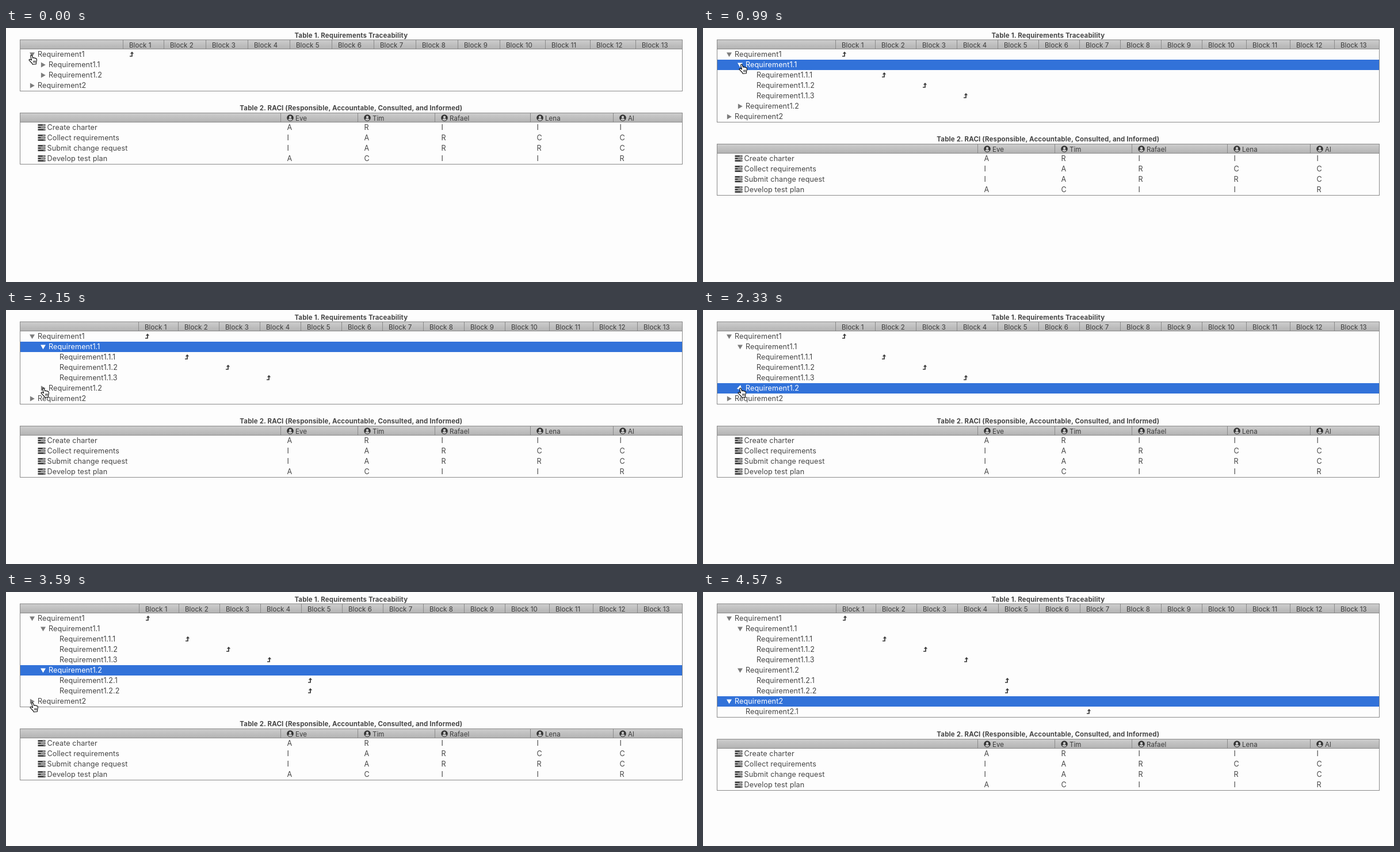
These frames come from a looping animation (1201x441 px, 8.17 s). An HTML page:

```html
<!DOCTYPE html>
<html lang="en">
<head>
<meta charset="utf-8">
<title>Requirements tables</title>
<style>
  html, body { margin: 0; width: 100%; height: 100%; overflow: hidden; background: #fdfdfd; }
  svg { display: block; width: 1201px; height: 441px; }
  text { font-family: Inter, "Open Sans", sans-serif; fill: #464646; white-space: pre; }
  .title { font-size: 11.5px; font-weight: 700; letter-spacing: .14px; text-anchor: middle; }
  .head { font-size: 11.5px; letter-spacing: .08px; fill: #3c3c3c; }
  .cell { font-size: 12.6px; letter-spacing: .1px; }
  .sel { fill: #fff; }
  .line { fill: none; stroke: #8a8a8a; shape-rendering: crispEdges; }
</style>
</head>
<body>
<svg viewBox="0 0 1201 441">
  <defs>
    <linearGradient id="bar" x1="0" y1="0" x2="0" y2="1">
      <stop offset="0" stop-color="#cecece"/>
      <stop offset="1" stop-color="#b2b2b2"/>
    </linearGradient>
    <g id="link">
      <path d="M-3.5 3.5H.5V-2" fill="none" stroke="#383838" stroke-width="1.7"/>
      <path d="M-2.7-1 .5-4.6 3.7-1Z" fill="#383838"/>
    </g>
    <g id="user">
      <circle r="5.8" fill="#333"/>
      <circle cy="-1.3" r="2.2" fill="#c8c8c8"/>
      <path d="M-3.7 3.3Q-3 1.1-1.4 1.2 0 2 1.4 1.2 3 1.1 3.7 3.3 0 6.2-3.7 3.3Z" fill="#c8c8c8"/>
    </g>
    <g id="task">
      <path d="M0 0H13V3H0ZM0 4H13V7H0ZM0 8H13V11H0Z" fill="#444"/>
      <path d="M8 1.5H12M5 5.5H12M10 9.5H12" stroke="#ddd"/>
    </g>
  </defs>
  <g id="tables"></g>
  <g id="hand" stroke-linejoin="round" stroke-linecap="round">
    <path d="M5.6 9.8 3.7 3.3C3.1 1.2 5.4.2 6.1 2L7.7 6.2C8.2 5.2 9.8 5.2 10.2 6.4 10.9 5.6 12.1 5.9 12.4 7 13.2 6.5 14.2 7.1 14.3 8.2 14.6 10.5 14.3 12.2 13.4 13.8L13.3 16.8 7 17.2 6.6 15.6C4.8 14 3.2 12 1.4 10.2.4 9 2 8 3.2 8.6Z" fill="#fff" stroke="#000" stroke-width="1.1"/>
    <path d="M8.6 11.2 8.8 14M10.3 11 10.4 13.9M12 10.8 12 13.7" stroke="#000" stroke-width=".8"/>
  </g>
</svg>
<script>
const LOOP = 8170, ROW = 18, LEFT = 24, RIGHT = 1176;
const tables = document.getElementById('tables');
const hand = document.getElementById('hand');

// label, depth, linked block, id of a folding row, id of the folding parent
const tree = [
  ['Requirement1', 0, 1, 'r1'],
  ['Requirement1.1', 1, 0, 'a'],
  ['Requirement1.1.1', 2, 2, '', 'a'],
  ['Requirement1.1.2', 2, 3, '', 'a'],
  ['Requirement1.1.3', 2, 4, '', 'a'],
  ['Requirement1.2', 1, 0, 'b'],
  ['Requirement1.2.1', 2, 5, '', 'b'],
  ['Requirement1.2.2', 2, 5, '', 'b'],
  ['Requirement2', 0, 0, 'c'],
  ['Requirement2.1', 1, 7, '', 'c']
];
// press: row is selected, turn: arrow points down, open: children appear
const folds = {
  r1: { press: -1, turn: -1, open: -1 },
  a: { press: 810, turn: 900, open: 990 },
  b: { press: 2330, turn: 2420, open: 2420 },
  c: { press: 3680, turn: 3760, open: 3760 }
};
const people = [['Eve', 477], ['Tim', 611], ['Rafael', 745], ['Lena', 911], ['Al', 1055]];
const tasks = [
  ['Create charter', 'ARIII'],
  ['Collect requirements', 'IARCC'],
  ['Submit change request', 'IARRC'],
  ['Develop test plan', 'ACIIR']
];

// start, end, step count, from, to, sideways bulge
const moves = [
  [270, 450, 3, [39, 46], [62, 62], 0],
  [1440, 2150, 9, [62, 62], [60, 134.5], 14],
  [2870, 3230, 5, [60, 134.5], [51, 190], 0],
  [3410, 3590, 3, [51, 190], [41, 191], 0],
  [4480, 4480, 1, [41, 191], [139, 304], 0]
];
const GONE = 4570;

const text = (x, y, s, cls) => `<text x="${x}" y="${y}" class="${cls}">${s}</text>`;
const use = (id, x, y) => `<use href="#${id}" x="${x}" y="${y}"/>`;

function frame(top, rows, seps) {
  const base = top + 17 + rows * ROW;
  const marks = seps.map(x => `M${x + .5} ${top}V${top + 16}`).join('');
  return `<rect x="${LEFT}" y="${top}" width="${RIGHT - LEFT}" height="17" fill="url(#bar)"/>` +
    `<path class="line" d="M${LEFT + .5} ${top + .5}H${RIGHT - .5}V${base + .5}H${LEFT + .5}Z` +
    `M${LEFT} ${top + 16.5}H${RIGHT}${marks}"/>`;
}

function blockEdges(t) {
  const [first, second, step, wide] =
    t < folds.a.open ? [203, 274, 73, 78.5] :
    t < folds.b.open ? [230, 299, 71, 76.5] : [231, 300, 70.9, 76.6];
  const edges = [first];
  for (let i = 0; i < 12; i++)
    edges.push(Math.round(second + step * Math.min(i, 8) + wide * Math.max(i - 8, 0)));
  return edges;
}

function triangle(x, y, fold, t, selected) {
  const angle = t < fold.press ? 0 : t < fold.turn ? 45 : 90;
  return `<path d="M-3.6-4.5 4.3 0-3.6 4.5Z" fill="${selected ? '#fff' : '#7d7d7d'}" ` +
    `transform="translate(${x} ${y}) rotate(${angle})"/>`;
}

function traceTable(t, rows) {
  const edges = blockEdges(t);
  const picked = ['c', 'b', 'a'].find(id => t >= folds[id].press);
  let out = text(599.8, 17, 'Table 1. Requirements Traceability', 'title');
  let body = '';
  rows.forEach(([label, depth, block, id], i) => {
    const y = 37 + i * ROW, shift = depth * 19, on = id && id === picked;
    if (on) body += `<rect x="${LEFT + 1}" y="${y}" width="${RIGHT - LEFT - 2}" height="${ROW}" fill="#3272d9"/>`;
    if (id) body += triangle(45.5 + shift, y + 9, folds[id], t, on);
    body += text(55 + shift, y + 13, label, on ? 'cell sel' : 'cell');
    if (block) body += use('link', edges[block - 1] + 15.5, y + 8.5);
  });
  out += frame(20, rows.length, edges) + body;
  edges.forEach((x, i) => out += text(x + 11, 34, 'Block ' + (i + 1), 'head'));
  return out;
}

function roleTable(top) {
  let out = text(599.8, top - 4, 'Table 2. RACI (Responsible, Accountable, Consulted, and Informed)', 'title');
  out += frame(top, tasks.length, people.map(p => p[1]));
  for (const [name, x] of people)
    out += use('user', x + 17, top + 9) + text(x + 26, top + 14, name, 'head');
  tasks.forEach(([label, roles], i) => {
    const y = top + 17 + i * ROW;
    out += use('task', 55.5, y + 3) + text(71.5, y + 13, label, 'cell');
    people.forEach(([, x], k) => out += text(x + 11.5, y + 13, roles[k], 'cell'));
  });
  return out;
}

function handAt(t) {
  let pos = moves[0][3];
  for (const [start, end, steps, from, to, bulge] of moves) {
    if (t < start) break;
    const gap = (end - start) / (steps - 1) || 1;
    const u = Math.min(Math.floor((t - start) / gap + 1.001), steps) / steps;
    const e = u * u * (3 - 2 * u);
    pos = [from[0] + (to[0] - from[0]) * e + bulge * Math.sin(Math.PI * e),
           from[1] + (to[1] - from[1]) * e];
  }
  return pos;
}

const cuts = ['a', 'b', 'c'].flatMap(id => Object.values(folds[id]));
let shown = -1;

function draw(t) {
  const stage = cuts.filter(c => t >= c).length;
  if (stage !== shown) {
    shown = stage;
    const rows = tree.filter(r => !r[4] || t >= folds[r[4]].open);
    tables.innerHTML = traceTable(t, rows) + roleTable(75 + rows.length * ROW);
  }
  const [x, y] = handAt(t);
  hand.setAttribute('transform', `translate(${x.toFixed(2)} ${y.toFixed(2)})`);
  hand.style.display = t < GONE ? '' : 'none';
}

function tick(now) {
  draw(now % LOOP);
  requestAnimationFrame(tick);
}
draw(0);
requestAnimationFrame(tick);
</script>
</body>
</html>
```
